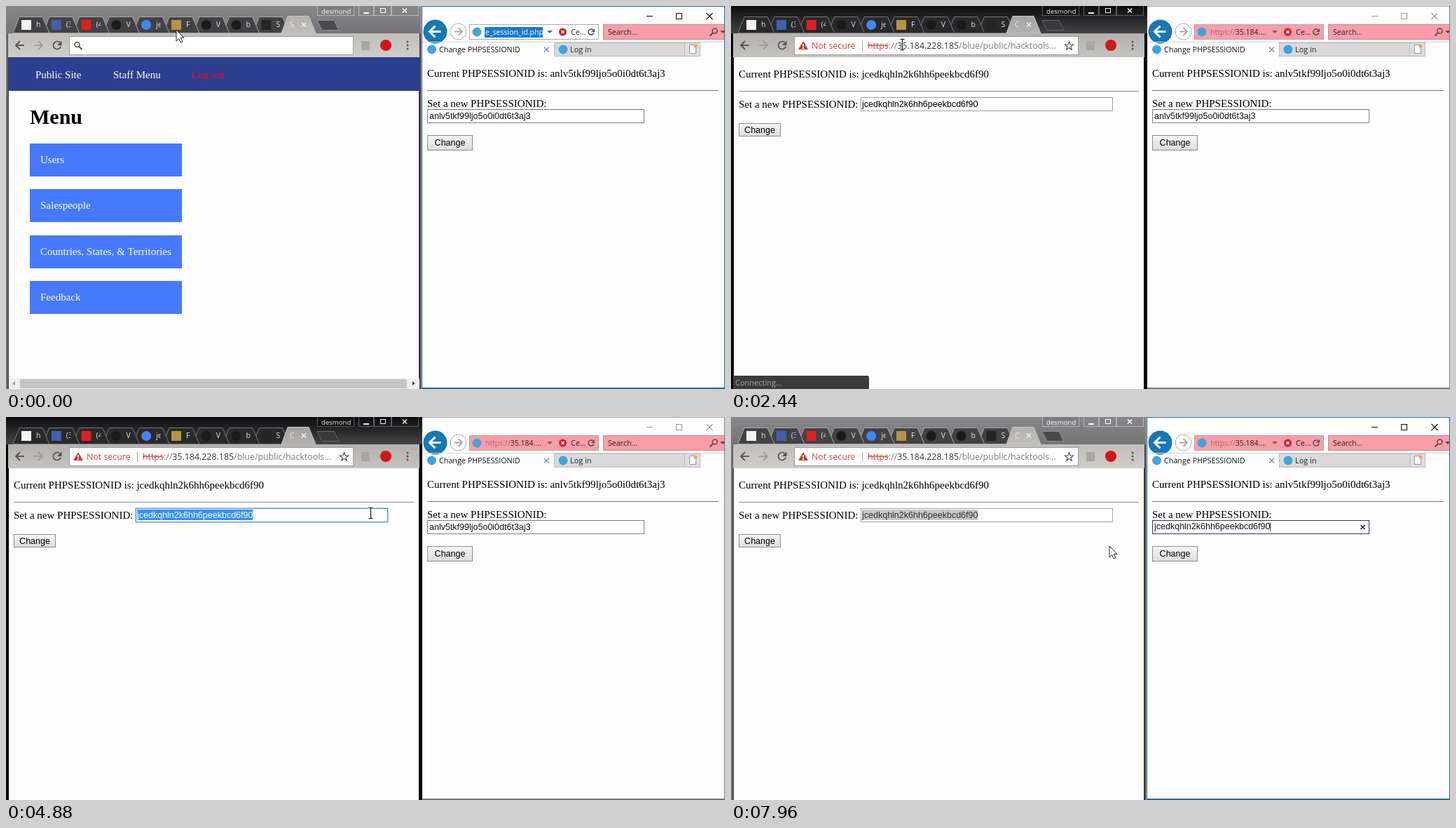
These frames come from a looping animation (1026x546 px, 8 s). An HTML page with a canvas:

```html
<!DOCTYPE html>
<html lang="en">
<head>
<meta charset="utf-8">
<title>Session change</title>
<style>
html, body { margin: 0; width: 100%; height: 100%; overflow: hidden; background: #000; }
canvas { display: block; }
</style>
</head>
<body>
<canvas id="stage" width="1026" height="546"></canvas>
<script>
const c = document.getElementById('stage').getContext('2d');
const LOOP = 8000;
const SERIF = '"Liberation Serif", serif', ARIAL = '"Liberation Sans", sans-serif', UI = '"Open Sans", sans-serif';
const OLD_ID = 'anlv5tkf99ljo5o0i0dt6t3aj3', NEW_ID = 'jcedkqhln2k6hh6peekbcd6f90';
const HOST = '35.184.228.185', PATH = '/blue/public/hacktools';

// Moments at which the state switches, in ms
const AT = { chrome: 480, paste: 1000, enter: 1500, load: 1880, connected: 2900,
  copySelect: 3820, ie: 6100, pasteSelect: 6440, pasted: 7240 };
const CLICKS = [[480, 242, 50], [3780, 368, 138], [6100, 753, 153], [6520, 753, 153]];
// time, x, y
const POINTER = [[0, 243, 34], [120, 243, 34], [420, 243, 50], [1300, 243, 50], [2440, 244, 55], [2800, 244, 55],
  [3500, 368, 138], [4500, 368, 138], [5400, 761, 136], [5700, 761, 136], [6000, 753, 153]];
const IE_POINTER = [[6100, 541, 185], [7000, 541, 185], [7400, 540, 184]];

function rect(x, y, w, h, fill, line) {
  if (fill) { c.fillStyle = fill; c.fillRect(x, y, w, h); }
  if (line) { c.strokeStyle = line; c.lineWidth = 1; c.strokeRect(x + .5, y + .5, w - 1, h - 1); }
}
function disc(x, y, r, fill, line, width = 1) {
  c.beginPath(); c.arc(x, y, r, 0, 7);
  if (fill) { c.fillStyle = fill; c.fill(); }
  if (line) { c.strokeStyle = line; c.lineWidth = width; c.stroke(); }
}
function poly(points, fill, line, width = 1, open) {
  c.beginPath();
  for (let i = 0; i < points.length; i += 2) c.lineTo(points[i], points[i + 1]);
  if (!open) c.closePath();
  if (fill) { c.fillStyle = fill; c.fill(); }
  if (line) { c.strokeStyle = line; c.lineWidth = width; c.stroke(); }
}
const path = (line, width, ...points) => poly(points, null, line, width, true);
function text(s, x, y, size, family, color = '#000', weight = '') {
  c.font = `${weight} ${size}px ${family}`;
  c.fillStyle = color;
  c.fillText(s, x, y);
  return x + c.measureText(s).width;
}
function fade(y0, y1, from, to) {
  const g = c.createLinearGradient(0, y0, 0, y1);
  g.addColorStop(0, from); g.addColorStop(1, to);
  return g;
}
function cross(x, y, r, color, width = 1.5) {
  path(color, width, x - r, y - r, x + r, y + r);
  path(color, width, x + r, y - r, x - r, y + r);
}
function lens(x, y, r, color) {
  disc(x, y, r, null, color, 1.5);
  path(color, 2, x + r * .7, y + r * .7, x + r * 2, y + r * 2);
}
function reload(x, y, r, color) {
  c.beginPath(); c.arc(x, y, r, .3, 5.4);
  c.strokeStyle = color; c.lineWidth = 1.7; c.stroke();
  poly([x + r + 1, y - r - 1, x + r + 1, y, x, y], color);
}
function arrow(x, y, r, dir, color, width) {
  path(color, width, x - r * dir, y, x + r * dir, y);
  path(color, width, x, y - r, x + r * dir, y, x, y + r);
}
const drop = (x, y, color) => poly([x - 4, y - 2, x + 4, y - 2, x, y + 2], color);

function button(x, y, w, h, label) {
  rect(x, y, w, h, fade(y, y + h, '#f6f6f6', '#dcdcdc'), '#8b8b98');
  text(label, x + (w - 43.8) / 2, Math.round(y + h / 2 + 4), 12.5, ARIAL);
}
function fieldText(s, x, y, selection, color) {
  c.font = `12.5px ${ARIAL}`;
  if (selection) rect(x, y - 12, c.measureText(s).width, 15, selection);
  return text(s, x, y, 12.5, ARIAL, color);
}

function tabs(on) {
  const icons = ['#f4f4f4', '#3f62ad', '#e02020', '#1b1b1b', '#4285f4', '#b59443', '#1b1b1b', '#1b1b1b', '#252525'];
  const labels = ['h', '(3', '(4', 'V', 'je', 'F', 'V', 'b', 'S'];
  const round = [3, 4, 6, 7];
  const edge = on ? '#77777a' : '#a9a9ac';
  for (let i = 8; i >= 0; i--) {
    const x = 10 + i * 42.8;
    poly([x, 38.5, x + 9, 15.5, x + 42, 15.5, x + 52, 38.5], on ? '#29292b' : '#424244', edge);
    const cx = x + 19;
    if (round.includes(i)) disc(cx, 27, 7, icons[i]);
    else rect(cx - 7, 20, 14, 14, icons[i]);
    c.save();
    c.beginPath(); c.rect(x + 30, 15, 9.5, 22); c.clip();
    text(labels[i], x + 33, 30, 10.5, UI, '#e6e6e6');
    c.restore();
  }
}

function chromeFrame(t, on) {
  rect(0, 0, 594, 546, on ? '#050506' : '#77777a');
  rect(0, 0, 594, 39, on ? fade(0, 39, '#0c0c0e', '#444447') : fade(0, 39, '#88888b', '#747477'));
  if (!on) {
    rect(2, 39, 2, 507, '#4a4a4c');
    rect(589, 39, 3, 507, '#3c3c3e');
    rect(592, 0, 1, 546, '#b7b7ba');
    rect(593, 0, 1, 546, '#2b5c90');
  }
  tabs(on);
  const bar = on ? ['#b4b2af', '#c5c3bf'] : ['#c1bfbb', '#cfcdc8'];
  poly([393, 39, 402, 14.5, 432, 14.5, 442, 39], fade(14, 39, on ? '#a2a2a2' : '#b2b1ae', bar[0]), '#c8c8c8');
  text(t < AT.load ? 'S' : 'C', 405, 30, 10.5, UI, '#f0f0f0');
  cross(425, 26.5, 3, '#f2f2f2');
  poly([444, 20.5, 468, 20.5, 475, 34.5, 451, 34.5], on ? '#39393b' : '#4a4a4d', on ? '#666' : '#909094');

  const edge = on ? '#5b5b5e' : '#b4b4b7', ink = on ? '#f0f0f0' : '#fff';
  rect(444, -1, 53, 15, on ? '#101012' : '#7d7d80', edge);
  text('desmond', 450, 10.5, 9.6, UI, ink);
  rect(503, -1, 22, 15, null, edge);
  rect(525, -1, 25, 15, null, edge);
  rect(550, -1, 39, 15, null, edge);
  rect(510, 9, 8, 2, ink);
  rect(534, 3, 8, 7, null, ink);
  cross(569, 6.5, 3, ink);

  rect(3, 39, 587, 34, fade(39, 73, ...bar));
  arrow(20, 56, 6, -1, '#505050', 1.8);
  arrow(46, 56, 6, 1, '#9c9a97', 1.8);
  reload(73, 56, 5.5, '#505050');
  rect(90, 43, 406, 27, '#fefefe', '#9c9c9c');
  rect(507, 50, 12, 13, '#a8a6a3');
  disc(542, 56, 8, '#cf1717');
  for (const y of [51, 56, 61]) disc(573, y, 1.5, '#555');
}

function urlBar(t) {
  const size = 12.4, gray = '#7b7b7b';
  if (t < AT.paste) {
    lens(101.5, 55, 3.5, '#555');
    if (t > AT.chrome && (t - AT.chrome) % 1000 < 500) rect(115, 48, 1, 17, '#222');
  } else if (t < AT.load) {
    poly([99.5, 50.5, 104, 50.5, 107.5, 54, 107.5, 62.5, 99.5, 62.5], '#fff', '#555');
    c.save();
    c.beginPath(); c.rect(114, 45, 378, 23); c.clip();
    const tail = PATH + '/change_session_id.php';
    c.font = `${size}px ${UI}`;
    const full = c.measureText('https://' + HOST + tail).width;
    let x = t < AT.enter ? 490 - full : 115;
    x = text('https://', x, 61, size, UI, gray);
    x = text(HOST, x, 61, size, UI, '#222');
    text(tail, x, 61, size, UI, gray);
    c.restore();
    if (t < AT.enter) rect(490, 48, 1, 17, '#222');
  } else {
    poly([103, 50, 110, 62, 96, 62], '#c23a31');
    rect(102, 54, 2, 4, '#fff'); rect(102, 59, 2, 2, '#fff');
    text('Not secure', 115, 61, size, UI, '#c4483e');
    rect(187, 49, 1, 15, '#aaa');
    let x = text('https', 195, 61, size, UI, '#c4483e');
    path('#c4483e', 1, 195, 56.5, x, 56.5);
    x = text('://', x, 61, size, UI, gray);
    x = text(HOST, x, 61, size, UI, '#333');
    text(PATH + '...', x, 61, size, UI, gray);
    const star = [];
    for (let i = 0; i < 10; i++) {
      const r = i % 2 ? 2.6 : 6.5, a = i * Math.PI / 5;
      star.push(482.5 + r * Math.sin(a), 57 - r * Math.cos(a));
    }
    poly(star, null, '#555', 1.2);
  }
}

function suggestions() {
  rect(4, 73, 586, 56, '#fdfdfd');
  rect(4, 128, 586, 1, '#dcdcdc');
  rect(90, 77, 406, 23, '#0b7bd4');
  poly([99.5, 82.5, 104, 82.5, 107.5, 86, 107.5, 94.5, 99.5, 94.5], null, '#fff');
  text('https://' + HOST + '/blue/public/hackto...', 115, 93, 12.7, UI, '#fff', 'bold');
  text('- Change PH...', 400, 93, 12.4, UI, '#b5dcf8');
  lens(101.5, 110.5, 3.5, '#555');
  text('https://' + HOST + PATH + '/change_session_i...', 115, 116, 12.4, UI, '#333');
}

function menuPage() {
  rect(4, 73, 586, 48, '#2c3f91');
  text('Public Site', 42, 103, 15, SERIF, '#fff');
  text('Staff Menu', 153, 103, 15, SERIF, '#fff');
  text('Log out', 265, 103, 15, SERIF, '#f00a1c');
  text('Menu', 34, 168, 30, SERIF, '#000', 'bold');
  ['Users', 'Salespeople', 'Countries, States, & Territories', 'Feedback'].forEach((s, i) => {
    const y = Math.round(195.7 + i * 65.5);
    rect(34, y, 217, 47, '#4679fb');
    text(s, 49, y + 28, 15, SERIF, '#fff');
  });
  rect(4, 531, 586, 15, '#f0f0f0');
  rect(20, 532, 552, 13, '#c5c5c5');
  poly([9, 538, 13, 535, 13, 541], '#999');
  poly([584, 538, 580, 535, 580, 541], '#444');
}

function sessionPage(t, on) {
  text('Current PHPSESSIONID is: ' + NEW_ID, 11, 102, 15, SERIF);
  rect(11, 121, 571, 1, '#8c8c8c');
  text('Set a new PHPSESSIONID:', 11, 145, 15, SERIF);
  const focused = on && t >= AT.copySelect - 40;
  rect(185, 130, 360, 20, '#fff', focused ? '#5a94dc' : '#a2a2a2');
  if (focused) { c.globalAlpha = .45; rect(184, 129, 362, 22, null, '#5a94dc'); c.globalAlpha = 1; }
  const selected = t >= AT.copySelect;
  fieldText(NEW_ID, 187, 144, selected && (on ? '#3390f8' : '#c8c8c8'), selected && on ? '#fff' : on ? '#000' : '#333');
  button(11, 167, 60, 19, 'Change');
  if (t < AT.connected) {
    c.beginPath(); c.roundRect(3, 527, 194, 22, [0, 3, 0, 0]);
    c.fillStyle = '#3b3b3d'; c.fill();
    text('Connecting...', 6, 541, 11, UI, '#ababab');
  }
}

function ieFrame(t, on) {
  const pink = '#fb9da8', first = t < AT.chrome;
  rect(594, 0, 432, 546, '#fdfdfd');
  rect(594, 0, 432, 1, on ? '#2d6598' : '#a8a8a8');
  const ink = on ? '#111' : '#999';
  rect(914, 14, 9, 1, ink);
  rect(956, 10, 9, 9, null, ink);
  cross(1004, 14.5, 4.5, ink, 1.1);

  disc(612.5, 36.5, 17, '#1878b4');
  arrow(612.5, 36.5, 8, -1, '#fff', 3);
  disc(645.5, 36.5, 11.5, '#fdfdfd', '#aaa');
  arrow(645.5, 36.5, 5.5, 1, '#aaa', 2);

  rect(661, 26, 185, 22, first ? '#fff' : pink, '#a9a9a9');
  disc(672, 37, 6.5, '#41a4dc');
  if (first) {
    rect(683, 30, 83, 15, '#1879d2');
    text('e_session_id.php', 684, 41, 10.5, UI, '#fff');
  } else {
    const x = text('https://', 684, 41, 10.5, UI, '#9c6870');
    text('35.184....', x, 41, 10.5, UI, '#222');
  }
  drop(776, 37, '#666');
  disc(794.5, 37, 5.5, '#c7202c');
  cross(794.5, 37, 2, '#fff');
  text('Ce...', 806, 41, 10.8, UI, '#222');
  reload(835, 37, 4, '#555');
  rect(852, 26, 180, 22, pink, '#b98a90');
  text('Search...', 859, 41, 10.7, UI, '#222');
  c.save();
  c.translate(1010, 37); c.scale(-1, 1);
  lens(-1.5, -1.5, 3.5, '#6b4249');
  c.restore();
  drop(1023, 37, '#6b4249');

  rect(594, 51, 432, 1, '#d5d5d5');
  rect(782, 52, 187, 20, '#d9d9d9', '#bcbcbc');
  rect(968, 52, 23, 20, '#dedede', '#bcbcbc');
  rect(975, 55, 10, 13, '#fff', '#999');
  disc(984, 57, 2.5, '#e6a84e');
  disc(607.5, 62, 6.5, '#41a4dc');
  text('Change PHPSESSIONID', 618, 66, 10.75, UI, '#111');
  cross(771.5, 62, 3.5, '#8b91ad');
  disc(795, 62, 6.5, '#41a4dc');
  text('Log in', 805, 66, 10.9, UI, '#222');
  rect(1025, 0, 1, 546, on ? '#2d6598' : '#777');
  rect(594, 544, 432, 2, on ? '#2d6598' : '#777');
}

function iePage(t) {
  text('Current PHPSESSIONID is: ' + OLD_ID, 601, 101, 15, SERIF);
  rect(601, 120, 416, 1, '#6d6d99');
  text('Set a new PHPSESSIONID:', 601, 144, 15, SERIF);
  const focused = t >= AT.ie;
  rect(601, 147, 310, 20, '#fff', focused ? '#2e3a5c' : '#7c7c8c');
  const selected = t >= AT.pasteSelect && t < AT.pasted;
  const end = fieldText(t < AT.pasted ? OLD_ID : NEW_ID, 604, focused ? 160 : 161, selected && '#1b7ad6', selected ? '#fff' : '#111');
  if (focused) {
    cross(901.5, 157, 3, '#222', 1.6);
    if (t >= AT.pasted) rect(Math.round(end), 150, 1, 13, '#333');
  }
  button(601, 184, 65, 22, 'Change');
}

function along(keys, t) {
  let i = keys.findIndex(k => k[0] > t);
  if (i < 0) return keys.at(-1).slice(1);
  if (i === 0) i = 1;
  const [t0, x0, y0] = keys[i - 1], [t1, x1, y1] = keys[i];
  let p = (t - t0) / (t1 - t0);
  p = p * p * (3 - 2 * p);
  return [x0 + (x1 - x0) * p, y0 + (y1 - y0) * p];
}

function pointer(t) {
  for (const [at, x, y] of CLICKS) {
    const age = t - at;
    if (age < 0 || age > 340) continue;
    c.globalAlpha = 1 - age / 420;
    disc(x, y, 4 + age * .042, null, '#9cbd32', 2);
    c.globalAlpha = 1;
  }
  const [x, y] = along(t < AT.ie ? POINTER : IE_POINTER, t);
  if (t < 300 || t >= AT.pasted) {
    poly([x, y, x, y + 16, x + 3.7, y + 12.5, x + 6.3, y + 18, x + 8.8, y + 17, x + 6.4, y + 11.6, x + 11, y + 11.4], '#fff', '#222');
    return;
  }
  const X = Math.round(x) + .5, Y = Math.round(y);
  for (const [color, width] of [['#fff', 3], ['#222', 1.3]]) {
    path(color, width, X, Y - 7, X, Y + 7);
    path(color, width, X - 3, Y - 7.5, X + 3, Y - 7.5);
    path(color, width, X - 3, Y + 7.5, X + 3, Y + 7.5);
  }
}

function draw(now) {
  const t = now % LOOP;
  const chromeOn = t >= AT.chrome && t < AT.ie;
  chromeFrame(t, chromeOn);
  urlBar(t);
  rect(4, 73, 585, 473, '#fdfdfd');
  if (t < AT.load) menuPage(); else sessionPage(t, chromeOn);
  if (t >= AT.paste && t < AT.enter) suggestions();
  ieFrame(t, !chromeOn);
  iePage(t);
  pointer(t);
  requestAnimationFrame(draw);
}
requestAnimationFrame(draw);
</script>
</body>
</html>
```
